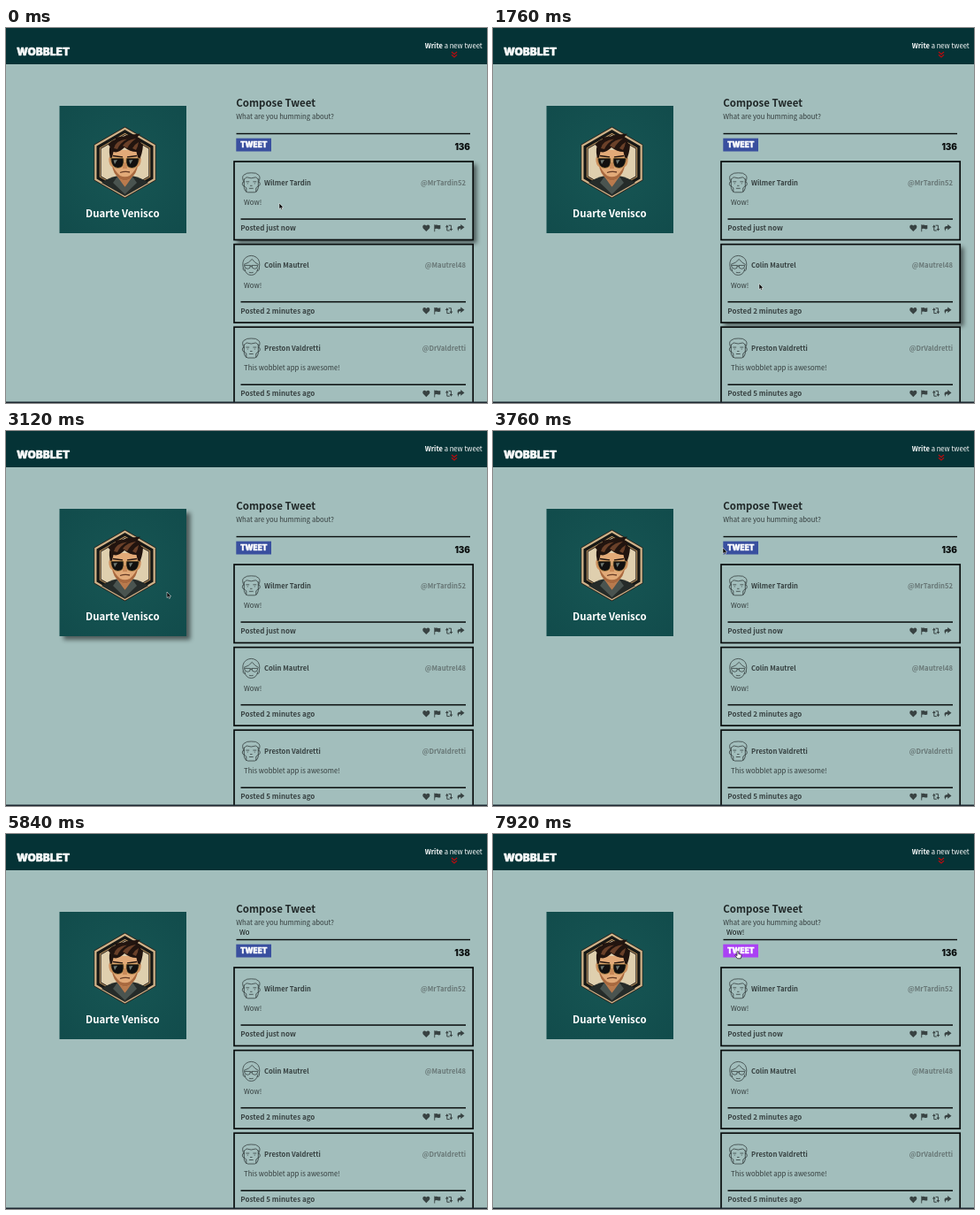
An HTML page for the animation above (8 s loop, 544x424 px).

```html
<!DOCTYPE html>
<html lang="en">
<head>
<meta charset="utf-8">
<title>Wobblet</title>
<style>
  html, body { margin: 0; width: 100%; height: 100%; overflow: hidden; background: #a2bebc; }
  svg { display: block; width: 544px; height: 424px; }
  text { font-family: "Noto Sans CJK JP", "Noto Sans CJK SC", "Noto Sans CJK", "Open Sans", sans-serif; font-size: 7.75px; fill: #343d3d; }
  .bold { font-weight: 700; }
  .name { font-size: 7.7px; fill: #364040; }
  .handle { font-size: 7.7px; fill: #687776; text-anchor: end; }
  .posted { font-size: 8.05px; fill: #384242; }
  .block { font-family: Inter, "Open Sans", sans-serif; font-weight: 900; stroke-width: .4; stroke-linejoin: round; }
  .light { fill: #fff; stroke: #fff; }
  .blur { filter: blur(2.4px); }
  .line { fill: none; stroke: #364040; stroke-width: .8; stroke-linecap: round; stroke-linejoin: round; }
</style>
</head>
<body>
<svg viewBox="0 0 544 424">
  <defs>
    <radialGradient id="panel" r=".75">
      <stop offset="0" stop-color="#175654"/>
      <stop offset="1" stop-color="#114b4b"/>
    </radialGradient>

    <g id="faceSquare" class="line">
      <path d="M-8-4V6Q-7.500 10-4 11H4Q7.500 10 8 6V-4"/>
      <path d="M-8.500-1Q-11-6-8.500-8.500Q-5-11.500 0-11Q6-11.500 8.500-8.500Q11-6 8.500-1"/>
      <path d="M-8-3.500Q-6-6-5-6Q0-4 5-6Q6.500-6 8-3.500M-8-1Q-10.500-1-10 2Q-9.500 4-8 4M8-1Q10.500-1 10 2Q9.500 4 8 4"/>
      <path d="M-5.500-1H-2.500M2.500-1H5.500M-4 1V1.200M4 1V1.200M-.8 3.500H.8M-2 6.500H2"/>
      <path d="M-8 4L-5.500 6V10.500M8 4L5.500 6V10.500"/>
    </g>
    <g id="faceGlasses" class="line">
      <path d="M-7.500 4Q-6 11 0 11Q6 11 7.500 4"/>
      <path d="M-9 3Q-11-5-6-9Q0-13 6-9Q11-5 9 3M-8-1Q-2-3 1-7Q4-3 8-1"/>
      <path d="M-9 3Q-10 6-7 6M9 3Q10 6 7 6"/>
      <path d="M-7.500 0H-1L-1.500 3Q-4 5-6.500 3ZM1 0H7.500L6.500 3Q4 5 1.500 3ZM-1 .8H1M-2 8Q0 8.700 2 8"/>
    </g>

    <g id="icons" fill="#384242">
      <path d="M475.300 230L471.700 226.400Q470.600 224.600 471.800 223Q473.600 221.700 475.300 223.600Q477 221.700 478.800 223Q480 224.600 478.900 226.400Z"/>
      <path d="M484.300 222.300H485.200V222.800Q486.700 222.200 488.100 222.800T491.300 222.700V227Q489.700 227.700 488.100 227.100T485.200 227.200V230.200H484.300Z"/>
      <path d="M498.800 224.500V229H501.800M500.600 223.200H503.400V227.500" fill="none" stroke="#384242" stroke-width="1"/>
      <path d="M496.900 225.300L498.800 222.600L500.700 225.300ZM501.500 226.900L503.400 229.600L505.300 226.900Z"/>
      <path d="M514.200 221.900L518.500 225.200L514.200 228.500V226.500Q511.400 226.300 511.700 230Q508.400 223.800 514.200 223.800Z"/>
    </g>
  </defs>

  <rect width="544" height="424" fill="#a2bebc"/>

  <rect width="544" height="41" fill="#053336"/>
  <text class="block light" x="12" y="31" style="font-size:12px">WOBBLET</text>
  <text x="473.800" y="23" style="font-size:7.65px;fill:#fff;font-weight:500"><tspan class="bold">Write</tspan> a new tweet</text>
  <path d="M504 27L507 29.700L510 27M504 30.200L507 32.900L510 30.200" fill="none" stroke="#b50d10" stroke-width="1.300"/>

  <rect id="profileShade" class="blur" x="65" y="92.500" width="143.500" height="143.500" fill="#000" opacity=".52"/>
  <rect x="60.500" y="88" width="143.500" height="144" fill="url(#panel)"/>
  <g id="rings"></g>
  <g id="portrait">
    <path d="M108 175Q116 169 127 167H142Q153 169 161 175L134.500 190Z" fill="#252b29"/>
    <path d="M127 162H142L143 171L134.500 180L126 171Z" fill="#b97a4d"/>
    <path d="M126 168L134.500 180L143 168L148 175L134.500 188L121 175Z" fill="#4a5450"/>
    <path d="M120 146Q115.500 144 116.500 151Q117.500 157 121 157H148Q151.500 157 152.500 151Q153.500 144 149 146Z" fill="#cf915f"/>
    <path d="M120 138H149V156Q147.500 165 139.500 171Q134.500 173.500 129.500 171Q121.500 165 120 156Z" fill="#e2aa78"/>
    <path d="M120 154Q123 162 129 167Q134.500 169.500 140 167Q146 162 149 154Q148.500 165 139.500 171Q134.500 173.500 129.500 171Q120.500 165 120 154Z" fill="#a8693f"/>
    <path d="M129 163.500Q134.500 161.500 140 163" fill="none" stroke="#643a25" stroke-width="1.300"/>
    <path d="M133 152L131.800 159H137.200L136 152Z" fill="#c98a59"/>
    <path d="M119 151Q115.500 140 117.500 134L115.500 132Q119 127 124 126L122.500 123.500Q132 123.500 138 121L152 119.500L148.500 123.500Q153 125 152.500 130L155 132Q154.500 142 150 151L147.500 140Q140 140 134 135Q127 142 121.500 140Z" fill="#21140f"/>
    <path d="M122 136Q124 127 137 125.500Q129 130 126 137ZM132 133Q137 126 147 125Q140 130 137 136ZM143 136Q146 131 150 129Q149 135 147 138Z" fill="#6a4029"/>
    <path d="M121 144.500L132 146M137 146L148 144.500" stroke="#21140f" stroke-width="1.500"/>
    <g fill="#11100f" stroke="#c79853" stroke-width=".8">
      <path d="M118.500 147H133Q134.500 158.500 126.500 158.500Q118.500 158 118.500 147Z"/>
      <path d="M136 147H150.500Q150.500 158 142.500 158.500Q134.500 158.500 136 147Z"/>
    </g>
    <path d="M121.500 149.500L126 149L123 154ZM139 149.500L143.500 149L140.500 154Z" fill="#6d7771"/>
  </g>
  <text class="bold" x="131.800" y="213.800" text-anchor="middle" style="font-size:11.4px;fill:#fff">Duarte Venisco</text>

  <text class="bold" x="260.300" y="88.800" style="font-size:11.46px;fill:#202828">Compose Tweet</text>
  <text x="260.300" y="103.300">What are you humming about?</text>
  <text id="draft" x="264" y="114.300" style="fill:#0c1010"></text>
  <rect x="260.500" y="118.800" width="264.500" height="1.400" fill="#080c0c"/>
  <rect id="button" x="260.300" y="124.700" width="39.700" height="14.800"/>
  <text class="block light" x="280.200" y="135.200" text-anchor="middle" style="font-size:8.3px">TWEET</text>
  <text id="count" class="block" x="525" y="138" text-anchor="end" style="font-size:9.8px;fill:#0b0f0f"></text>

  <g id="cards"></g>
  <rect y="422.500" width="544" height="1.500" fill="#1d2730"/>

  <g id="pointer">
    <path id="arrow" d="M0 0V6.600L1.500 5.300L2.500 7.500L3.700 7L2.700 4.900H4.700Z" fill="#000" stroke="#fff" stroke-width=".5"/>
    <g id="beam" fill="none">
      <path d="M-1.500-4Q0-4 0-3V3Q0 4-1.500 4M1.500-4Q0-4 0-3V3Q0 4 1.500 4M-1 1H1" stroke="#e6eeee" stroke-width="1.500"/>
      <path d="M-1.500-4Q0-4 0-3V3Q0 4-1.500 4M1.500-4Q0-4 0-3V3Q0 4 1.500 4M-1 1H1" stroke="#111" stroke-width=".7"/>
    </g>
    <path id="hand" d="M-1-3Q0-4 .8-3V-.4L3.300 .1Q4.300 .5 4 2L3.200 4.800H-.6L-3 1.600Q-3.200 .3-2 .8L-1 1.700Z" fill="#fff" stroke="#111" stroke-width=".7"/>
  </g>
</svg>
<script>
const $ = id => document.getElementById(id);
const LOOP = 8000, STEP = 80, PITCH = 93.6;

const posts = [
  { name: 'Wilmer Tardin', handle: '@MrTardin52', body: 'Wow!', age: 'just now', face: 'faceSquare' },
  { name: 'Colin Mautrel', handle: '@Mautrel48', body: 'Wow!', age: '2 minutes ago', face: 'faceGlasses' },
  { name: 'Preston Valdretti', handle: '@DrValdretti', body: 'This wobblet app is awesome!', age: '5 minutes ago', face: 'faceSquare' }
];

$('cards').innerHTML = posts.map((p, i) => `
  <g transform="translate(0 ${i * PITCH})">
    <rect class="shade blur" x="261.5" y="154.5" width="271" height="89" fill="#000" opacity=".5"/>
    <rect x="258" y="151" width="270.200" height="88.500" fill="#a2bebc" stroke="#080c0c" stroke-width="1.700"/>
    <use href="#${p.face}" x="277.300" y="174.800"/>
    <text class="bold name" x="292" y="177.800">${p.name}</text>
    <text class="bold handle" x="520" y="177.800">${p.handle}</text>
    <text x="269" y="200.200">${p.body}</text>
    <rect x="265.500" y="215.300" width="254.500" height="1.500" fill="#080c0c"/>
    <text class="bold posted" x="265.300" y="229.300">Posted ${p.age}</text>
    <use href="#icons"/>
  </g>`).join('');
const shades = [...document.querySelectorAll('.shade')];

// Nested hexagons of the portrait frame
const hexagon = r => Array.from({ length: 6 }, (_, i) => {
  const a = Math.PI * (i / 3 - .5);
  return `${134.5 + r * Math.cos(a)},${152 + r * Math.sin(a)}`;
}).join(' ');
$('rings').innerHTML = [[40.4, '#2a211a'], [39.6, '#cfb389'], [37, '#171816'], [33.2, '#b8925f'], [32, '#241c17'], [31, '#dfcfae']]
  .map(([r, fill]) => `<polygon points="${hexagon(r)}" fill="${fill}"/>`).join('');

// Pointer path: time, x, y
const path = [
  [0, 309, 198], [640, 309, 203], [1440, 301, 289], [2000, 301, 289],
  [2400, 297, 370], [2720, 295, 360], [3040, 182, 182], [3280, 182, 182],
  [3760, 260, 132], [3920, 260, 123], [4240, 278, 111], [6320, 278, 111],
  [6640, 269, 116], [7120, 269, 116], [7520, 277, 136], [8000, 277, 136]
];
const keys = [5600, 5760, 5920, 6080];
const draft = 'Wow!';

function pointerAt(t) {
  const i = path.findIndex(k => k[0] > t);
  const [t0, x0, y0] = path[i - 1], [t1, x1, y1] = path[i];
  const u = (t - t0) / (t1 - t0), e = u * u * (3 - 2 * u);
  return [x0 + (x1 - x0) * e, y0 + (y1 - y0) * e];
}

const show = (el, on) => el.setAttribute('visibility', on ? 'visible' : 'hidden');

function render(now) {
  const t = Math.floor(now % LOOP / STEP) * STEP;
  const [x, y] = pointerAt(t);
  const inside = (l, top, w, h) => x >= l && x <= l + w && y >= top && y <= top + h;

  shades.forEach((s, i) => show(s, inside(257, 150.5 + i * PITCH, 272, 90)));
  show($('profileShade'), inside(60.5, 88, 143.5, 144));

  const onButton = inside(260.3, 124.7, 39.7, 14.8);
  const onField = inside(260.3, 104, 264.7, 15);
  $('button').setAttribute('fill', onButton ? '#aa41f4' : '#394f9f');

  const typed = keys.filter(k => t >= k).length;
  $('draft').textContent = draft.slice(0, typed);
  $('count').textContent = typed ? 140 - typed : 136;

  const hidden = t >= keys[0] && t < 6320;
  $('pointer').setAttribute('transform', `translate(${x} ${y})`);
  show($('arrow'), !hidden && !onButton && !onField);
  show($('beam'), !hidden && onField);
  show($('hand'), onButton);
}

const start = performance.now();
function frame() {
  render(performance.now() - start);
  requestAnimationFrame(frame);
}
frame();
</script>
</body>
</html>
```
